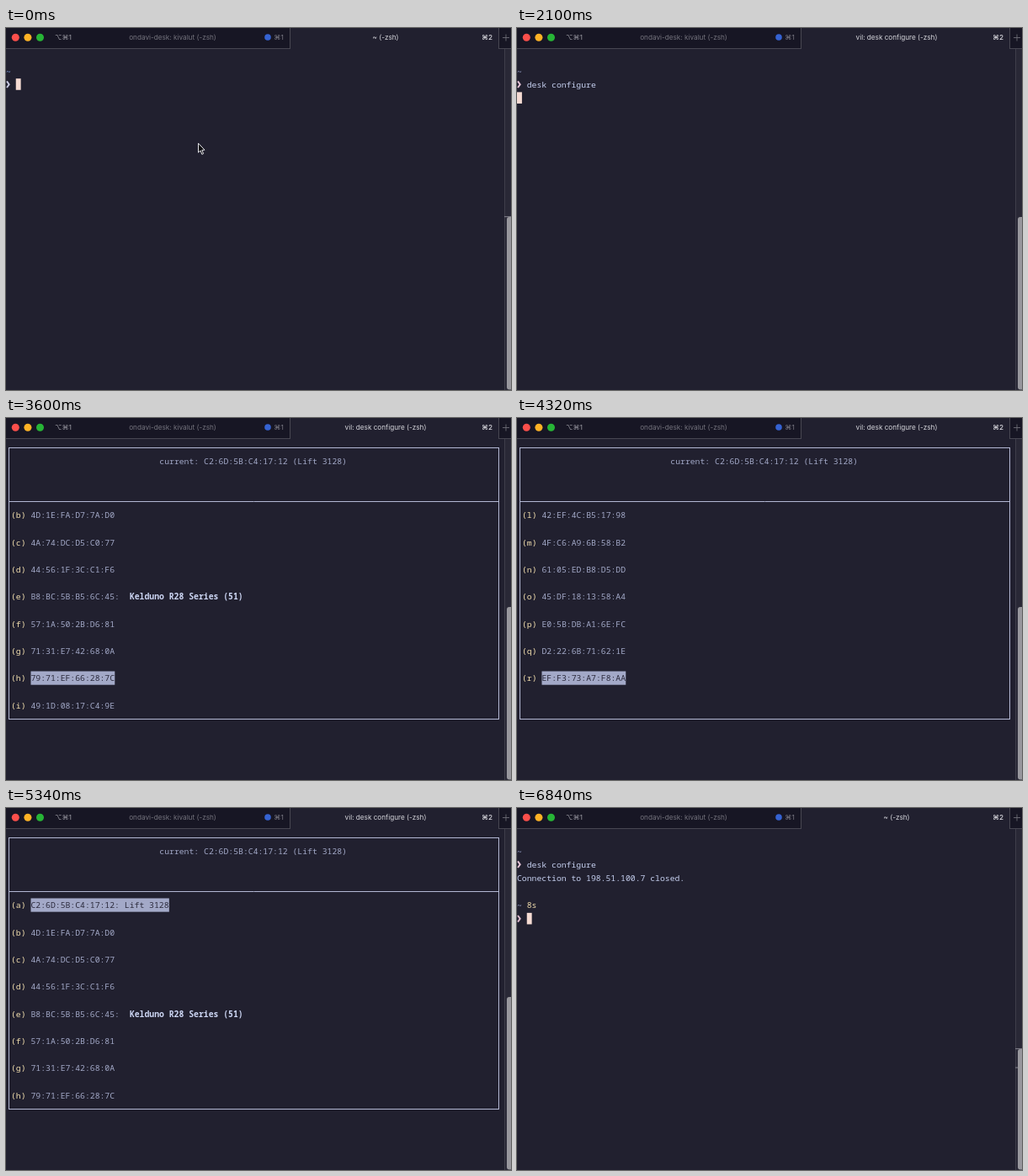
Write an HTML page with a canvas that moves like this. It is 600 px wide and 431 px high and loops after 6900 ms.

```html
<!DOCTYPE html>
<html lang="en">
<head>
<meta charset="utf-8">
<style>
  html, body { margin: 0; height: 100%; overflow: hidden; background: #21202f; }
  canvas { display: block; }
</style>
</head>
<body>
<canvas id="stage"></canvas>
<script>
const LOOP = 6900, W = 600, H = 431;
const CHAR = 5.87, ROW = 16.17;
const MONO = '"Noto Sans Mono", "DejaVu Sans Mono", monospace';
const SANS = 'Inter, "DejaVu Sans", sans-serif';
const BG = '#21202f', BAR = '#171624', EDGE = '#484752';
const TEXT = '#c6d0f0', DIM = '#a3a9c8', YELLOW = '#f3dfae', CURSOR = '#f5dbd3';

const DESK = 'C2:6D:5B:C4:17:12';
const TV = 'Kelduno R28 Series (51)';
const items = [
  DESK + ': Lift 3128', '4D:1E:FA:D7:7A:D0', '4A:74:DC:D5:C0:77',
  '44:56:1F:3C:C1:F6', 'B8:BC:5B:B5:6C:45:', '57:1A:50:2B:D6:81',
  '71:31:E7:42:68:0A', '79:71:EF:66:28:7C', '49:1D:08:17:C4:9E',
  '5C:83:2A:F0:16:B7', '68:0E:D4:91:3B:C5', '42:EF:4C:B5:17:98',
  '4F:C6:A9:6B:58:B2', '61:05:ED:B8:D5:DD', '45:DF:18:13:58:A4',
  'E0:5B:DB:A1:6E:FC', 'D2:22:6B:71:62:1E', 'EF:F3:73:A7:F8:AA'
];
const LAST = items.length - 1;

// Moments in ms
const TYPE = 240, ENTER = 960, TITLE = 1020, MENU = 2160, UP = 4360, QUIT = 5700, PROMPT = 5820;

const canvas = document.getElementById('stage');
const c = canvas.getContext('2d');
const ratio = window.devicePixelRatio || 1;
canvas.width = W * ratio;
canvas.height = H * ratio;
canvas.style.width = W + 'px';
canvas.style.height = H + 'px';

function rect(x, y, w, h, color) {
  c.fillStyle = color;
  c.fillRect(x, y, w, h);
}

function dot(x, y, r, color) {
  c.fillStyle = color;
  c.beginPath();
  c.arc(x, y, r, 0, 7);
  c.fill();
}

function line(points, color, width) {
  c.strokeStyle = color;
  c.lineWidth = width;
  c.beginPath();
  points.forEach(([x, y]) => c.lineTo(x, y));
  c.stroke();
}

const rowY = row => 51 + row * ROW;

function mono(text, x, row, color, weight = 500) {
  c.font = `${weight} 9.78px ${MONO}`;
  c.textAlign = 'left';
  c.fillStyle = color;
  c.fillText(text, x, rowY(row) + 3.6);
}

function label(text, x, color, size = 8.2, weight = 400) {
  c.font = `${weight} ${size}px ${SANS}`;
  c.textAlign = 'center';
  c.fillStyle = color;
  c.fillText(text, x, 14);
}

function cursor(col, row) {
  rect(col * CHAR, rowY(row) - 7, 5.9, 13.6, CURSOR);
}

function prompt(row, color) {
  const y = rowY(row);
  line([[1, y - 3.8], [3.7, y], [1, y + 3.8]], color, 1.9);
}

function spinner(t) {
  const head = Math.floor(t / 60);
  for (let i = 0; i < 12; i++) {
    const a = i * Math.PI / 6, dx = Math.cos(a), dy = Math.sin(a);
    const age = (((head - i) % 12) + 12) % 12;
    c.globalAlpha = 0.9 - age * 0.06;
    line([[309 + dx * 2.6, 11 + dy * 2.6], [309 + dx * 5.2, 11 + dy * 5.2]], '#8d8c98', 0.9);
  }
  c.globalAlpha = 1;
}

function tabs(t) {
  rect(0, 0, 337, 24, BAR);
  rect(586, 0, 14, 24, BAR);
  rect(0, 24, 338, 1, EDGE);
  rect(585, 24, 15, 1, EDGE);
  rect(337, 0, 1, 25, EDGE);
  rect(585, 0, 1, 25, EDGE);
  ['#fb4f4b', '#fdb225', '#27b536'].forEach((color, i) => dot(11.3 + i * 14.6, 11.2, 4.5, color));
  label('⌥⌘1', 68, '#8b8a93', 8.2, 500);
  label('ondavi-desk: kivalut (-zsh)', 198, '#74737d');
  if (t >= MENU && t < 3480) spinner(t);
  else dot(311, 11, 3.8, '#3563d2');
  label('⌘1', 324, '#7d7c86');
  const busy = t >= TITLE && t < PROMPT;
  label(busy ? 'vil: desk configure (-zsh)' : '~ (-zsh)', 451, '#d6d6dc');
  label('⌘2', 571.5, '#e0e0e5', 8.2, 500);
  line([[590, 11.5], [598, 11.5]], '#6c6b75', 0.9);
  line([[594, 7.5], [594, 15.5]], '#6c6b75', 0.9);
}

function scrollbar(t) {
  const done = t >= PROMPT, top = done ? 287 : 225;
  rect(592, 25, 8, 406, '#292836');
  rect(592, 25, 1, 406, '#3f3e4a');
  const marks = done ? [286, 308.5] : t < TYPE ? [224] : [];
  marks.forEach(y => rect(592, y, 8, 1.2, '#777681'));
  c.fillStyle = '#98979d';
  c.beginPath();
  c.roundRect(595, top, 7, 205.5 + 225 - top, 3);
  c.fill();
}

function pointer() {
  c.beginPath();
  [[228.5, 137.2], [228.5, 148.2], [231, 146], [232.8, 150.4], [234.6, 149.6],
   [232.8, 145.4], [236, 145.2]].forEach(([x, y]) => c.lineTo(x, y));
  c.closePath();
  c.fillStyle = '#0c0c10';
  c.fill();
  c.strokeStyle = '#e4e4e8';
  c.lineWidth = 1;
  c.stroke();
}

function shell(t) {
  const fresh = t < TYPE;
  const command = 'desk configure';
  const typed = fresh ? 0 : Math.min(command.length, 1 + Math.floor((t - TYPE) / 660 * 13));
  mono('~', 0, 0, fresh ? '#7fa2e0' : '#9aa5cc');
  prompt(1, fresh ? '#c9cbe4' : '#e8c6d8');
  mono(command.slice(0, typed), 2 * CHAR, 1, TEXT);
  if (t < ENTER) cursor(2 + typed, 1);
  else if (t < QUIT) cursor(0, 2);
  else {
    mono('Connection to 198.51.100.7 closed.', 0, 2, TEXT);
    if (t < PROMPT) return cursor(0, 3);
    mono('~', 0, 4, '#9aa5cc');
    mono('8s', 2 * CHAR, 4, YELLOW);
    prompt(5, '#e0bccf');
    cursor(2, 5);
  }
}

// Steps made by a held key: one press, a delay, then fast repeats
function held(t, press, repeat) {
  const steps = t < press ? 0 : t < repeat ? 1 : 2 + Math.floor((t - repeat) / 45);
  return Math.min(LAST, steps);
}

function menu(t) {
  const picked = held(t, 2940, 3345) - held(t, UP, 4650);
  const first = t < UP ? Math.max(0, picked - 6) : Math.min(LAST - 6, Math.max(0, picked - 1));
  c.strokeStyle = '#b3b8d4';
  c.lineWidth = 1;
  c.strokeRect(3.5, 35.5, 582, 323);
  line([[3, 99.5], [586, 99.5]], '#b3b8d4', 1);
  mono(`current: ${DESK} (Lift 3128)`, 182.3, 0, DIM);
  items.slice(first, first + 8).forEach((item, i) => {
    const n = first + i, row = 4 + i * 2, x = 6 + 4 * CHAR, on = n === picked;
    mono(`(${String.fromCharCode(97 + n)})`, 6, row, YELLOW);
    if (on) rect(x, rowY(row) - 8.2, item.length * CHAR, ROW, DIM);
    mono(item, x, row, on ? '#2b2a3c' : DIM);
    if (n === 4) mono(TV, x + 20 * CHAR, row, '#cdd6f4', 600);
  });
}

function draw(t) {
  c.setTransform(ratio, 0, 0, ratio, 0, 0);
  rect(0, 0, W, H, BG);
  tabs(t);
  scrollbar(t);
  if (t >= MENU && t < QUIT) menu(t);
  else shell(t);
  if (t < 60) pointer();
}

const start = performance.now();
function tick() {
  draw((performance.now() - start) % LOOP);
  requestAnimationFrame(tick);
}
tick();
</script>
</body>
</html>
```
